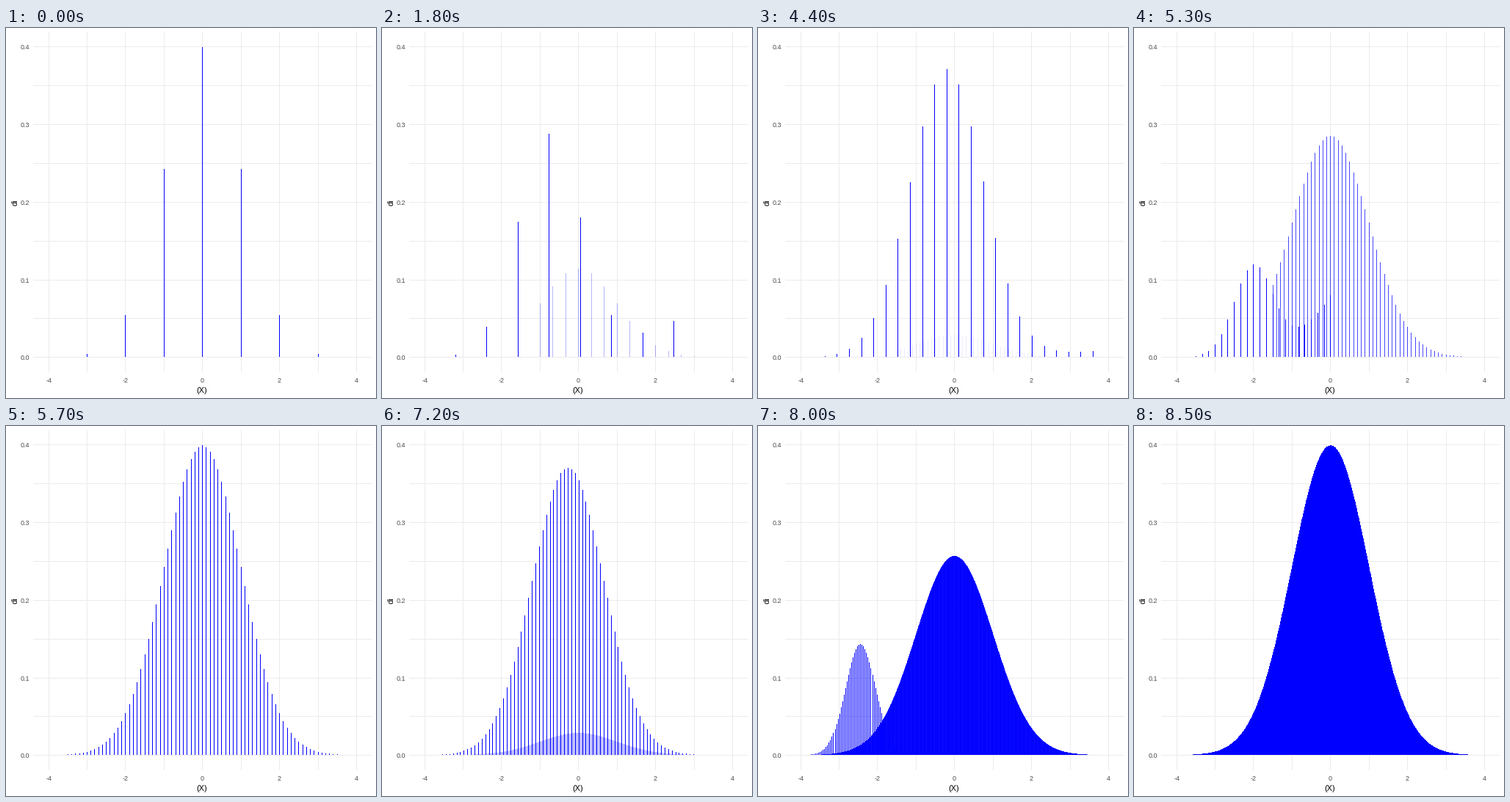
Write a matplotlib script that moves like this. It is 504 by 504 pixels and loops after 10 s.

```python
import numpy as np
import matplotlib.pyplot as plt
from matplotlib.animation import FuncAnimation
from matplotlib.collections import LineCollection

SIZE, DPI = 504, 72
FRAMES, INTERVAL = 100, 100
TWEEN = 14                      # frames per transition
STARTS = (14, 43, 71)           # last still frame before each transition
LEFT, RIGHT, TOP, BOTTOM = 37, 498, 5, 469
BLUE = (0, 0, 1)

plt.rcParams["font.family"] = "Liberation Sans"


def px(x):
    return np.floor(267.75 + 52.42 * np.asarray(x))


def py(y):
    return np.floor(448.72 - 1057.2 * np.asarray(y))


def density(x):
    return np.exp(-x**2 / 2) / np.sqrt(2 * np.pi)


# The same density sampled ever more finely
STATES = [np.linspace(-4, 4, n) for n in (9, 25, 81, 1601)]


def bars_at(frame):
    """Positions, heights and opacities of all bars."""
    k = sum(frame > s for s in STARTS)
    if k == 0:
        x = STATES[0]
        return x, density(x), np.ones_like(x)
    old, new = STATES[k - 1], STATES[k]
    t = min((frame - STARTS[k - 1]) / TWEEN, 1)
    n = len(old)
    x, h = new.copy(), density(new)
    # Existing bars slide to the first new places; the rest grow and fade in.
    x[:n] += (1 - t) * (old - x[:n])
    h[:n] += (1 - t) * (density(old) - h[:n])
    h[n:] *= t
    alpha = np.full(len(new), t)
    alpha[:n] = 1
    return x, h, alpha


fig = plt.figure(figsize=(SIZE / DPI, SIZE / DPI), dpi=DPI, facecolor="white")
ax = fig.add_axes((0, 0, 1, 1))
ax.set_xlim(0, SIZE)
ax.set_ylim(SIZE, 0)
ax.axis("off")


def add_lines(segments, color):
    lines = LineCollection(segments, colors=color, linewidths=1,
                           capstyle="butt", snap=False)
    return ax.add_collection(lines, autolim=False)


grid = [[(c + 0.5, TOP), (c + 0.5, BOTTOM)] for c in px(np.arange(-4, 5))]
grid += [[(LEFT, r + 0.5), (RIGHT, r + 0.5)]
         for r in py(np.arange(9) * 0.05)]
add_lines(grid, "#ebebeb")
bars = add_lines([], BLUE)

tick = dict(fontsize=9, color="#4d4d4d", va="baseline")
for v in range(-4, 5, 2):
    ax.text(px(v) + 0.5, 483, str(v), ha="center", **tick)
for i in range(5):
    ax.text(32.3, py(i / 10) + 4, f"{i / 10:.1f}", ha="right", **tick)
ax.text(267, 497, "(X)", fontsize=11, ha="center", va="baseline")
ax.text(15.5, 237.5, "di", fontsize=11, rotation=90,
        rotation_mode="anchor", ha="center", va="baseline")


def update(frame):
    x, h, alpha = bars_at(frame)
    base, top, col = py(0), py(h), px(x) + 0.5
    seen = top < base
    col, top, alpha = col[seen], top[seen], alpha[seen]
    ends = [np.column_stack([col, y]) for y in (np.full_like(col, base), top)]
    bars.set_segments(np.stack(ends, axis=1))
    bars.set_color([(*BLUE, a) for a in alpha])
    return (bars,)


anim = FuncAnimation(fig, update, frames=FRAMES, interval=INTERVAL,
                     repeat=True, repeat_delay=0, blit=False)
plt.show()
```
